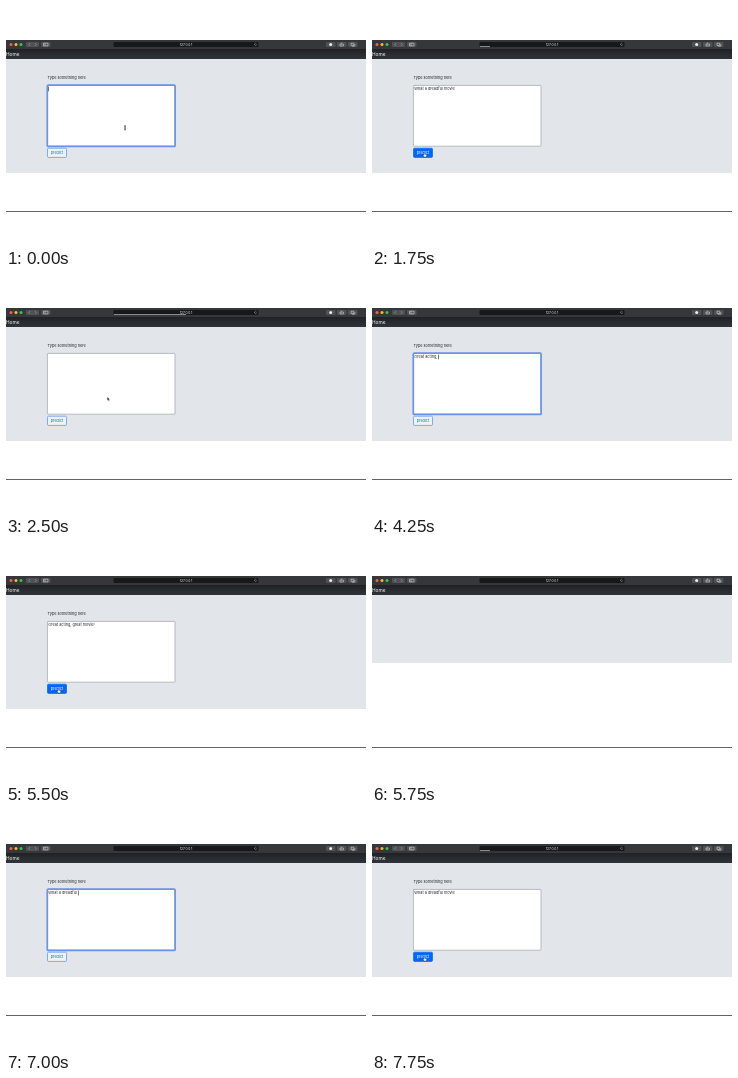
Animation of 360x240 px, one loop 8000 ms. Source, as an HTML page:

```html
<!DOCTYPE html>
<html lang="en">
<head>
<meta charset="utf-8">
<title>Predict form</title>
<style>
html, body { margin: 0; width: 100%; height: 100%; overflow: hidden; background: #fff; }
svg { display: block; width: 360px; height: 240px; }
text { font-family: Inter, "Open Sans", sans-serif; font-size: 3.8px; fill: #212529; white-space: pre; }
.icon { fill: none; stroke: #d5d5d7; stroke-width: .6; }
.tool { fill: #505154; }
#box { fill: #fff; stroke: #9ea3a9; stroke-width: .7; }
#ring { fill: none; stroke: #6c93e6; stroke-width: 1.7; }
#btn rect { fill: #edf2f8; stroke: #4f93dc; stroke-width: .7; }
#btn text { fill: #1670cf; text-anchor: middle; }
#btn.on rect { fill: #0765f5; stroke: #0765f5; }
#btn.on text { fill: #fff; }
</style>
</head>
<body>
<svg viewBox="0 0 360 240">
  <defs>
    <linearGradient id="nav" x2="0" y2="1">
      <stop stop-color="#202124"/><stop offset="1" stop-color="#30343a"/>
    </linearGradient>
  </defs>
  <rect width="360" height="240" fill="#fff"/>
  <rect y="34" width="360" height="9" fill="#36373a"/>
  <circle cx="5" cy="38.5" r="1.5" fill="#f45f57"/>
  <circle cx="10" cy="38.5" r="1.5" fill="#f3bd36"/>
  <circle cx="15" cy="38.5" r="1.5" fill="#36c84b"/>
  <g class="tool">
    <rect x="20" y="36" width="13" height="5" rx="1"/>
    <rect x="35" y="36" width="9.5" height="5" rx="1"/>
    <rect x="320" y="36" width="9.5" height="5" rx="1"/>
    <rect x="331" y="36" width="9.5" height="5" rx="1"/>
    <rect x="342" y="36" width="9.5" height="5" rx="1"/>
  </g>
  <g class="icon">
    <path d="M24 37.2l-1.2 1.3 1.2 1.3M29 37.2l1.2 1.3-1.2 1.3" opacity=".7"/>
    <path d="M37.5 37.2h4.5v2.7h-4.5zM39 37.2v2.7"/>
    <path d="M335 38h-1v2h3.4v-2h-1M335.7 39v-2.4"/>
    <path d="M345 37.2h2.7v2.2h-2.7zM346 40.2h2.8v-2.2"/>
  </g>
  <circle cx="324.7" cy="38.5" r="1.5" fill="#eee"/>
  <rect x="107.5" y="36" width="145" height="5" rx="1" fill="#17181a"/>
  <text x="180" y="39.8" text-anchor="middle" style="font-size:3.3px;fill:#eee">127.0.0.1</text>
  <path class="icon" d="M250.3 37.5a1.1 1.1 0 1 0 .4 1" style="stroke-width:.4"/>
  <rect id="load" x="108" y="40.2" height=".8" fill="#a5a8ad"/>
  <rect y="43" width="360" height="10" fill="url(#nav)"/>
  <text x="0" y="49.8" style="font-size:4.8px;fill:#fff">Home</text>
  <rect id="panel" y="53" width="360" height="114" fill="#e2e6eb"/>
  <g id="form">
    <text x="41.5" y="73.4" style="font-size:3.85px">Type something here</text>
    <rect id="box" x="41.4" y="79.4" width="127.6" height="60.8" rx=".6"/>
    <rect id="ring" x="41.3" y="79.2" width="127.8" height="61.2" rx="1"/>
    <text id="typed" x="42.3" y="84.2"></text>
    <rect id="caret" y="80.6" width=".6" height="4.8" fill="#222"/>
    <g id="btn">
      <rect x="41.5" y="142.2" width="19" height="9.2" rx="1"/>
      <text x="51" y="148">predict</text>
    </g>
  </g>
  <path id="beam" d="M-1-2.2q1 0 1 .7v3q0 .7-1 .7M1-2.2q-1 0-1 .7v3q0 .7 1 .7" fill="none" stroke="#333" stroke-width=".6"/>
  <path id="arrow" d="M0 0v3.6l.9-.8.7 1.4.6-.3-.7-1.3h1.1z" fill="#111" stroke="#fff" stroke-width=".25"/>
  <path id="hand" d="M0 0q.6-.4.7.3v1.4l1.7.4q.5.2.3 1l-.4 1.4h-2.1l-1.2-1.6q0-.6.9-.1z" fill="#fff" stroke="#111" stroke-width=".35"/>
  <rect y="205" width="360" height="1" fill="#62606a"/>
</svg>
<script>
const LOOP = 8000, ROUND = 6000, STEP = 250, RATE = 16 / 1000;
const el = id => document.getElementById(id);
const show = (id, on) => { el(id).style.display = on ? "" : "none"; };
const within = (t, a, b) => t >= a && t < b;

function place(id, on, x, y) {
  show(id, on);
  el(id).setAttribute("transform", `translate(${x} ${y})`);
}

function draw(t) {
  const first = t < 2500;
  const line = first ? "What a dreadful movie" : "Great acting, great movie!";
  const since = first ? t : t - 3375;
  const text = line.slice(0, Math.max(0, Math.floor(since * RATE)));
  const result = within(t, 2000, 2500) || t >= 5750;
  const focus = t < 1750 || within(t, 3250, 5500);
  const hover = within(t, 1500, 2000) || within(t, 5250, 5750);

  show("form", !result);
  el("panel").setAttribute("height", result ? 68 : 114);
  el("typed").textContent = text;
  show("ring", focus);
  show("caret", focus);
  if (!result) el("caret").setAttribute("x", 42.3 + (text ? el("typed").getComputedTextLength() : 0));
  el("btn").classList.toggle("on", hover);

  const load = within(t, 1750, 2000) ? 10 : within(t, 2500, 2750) ? 72 : within(t, 2750, 3000) ? 144 : 0;
  el("load").setAttribute("width", load);

  place("beam", t < STEP || within(t, 2750, 3500), 119, 121.8);
  place("arrow", within(t, 2500, 2750), 101.3, 123);
  place("hand", hover, 52, 146.5);
}

const start = performance.now();
function tick() {
  const t = (performance.now() - start) % LOOP % ROUND;
  draw(Math.floor(t / STEP) * STEP);
  requestAnimationFrame(tick);
}
tick();
</script>
</body>
</html>
```
